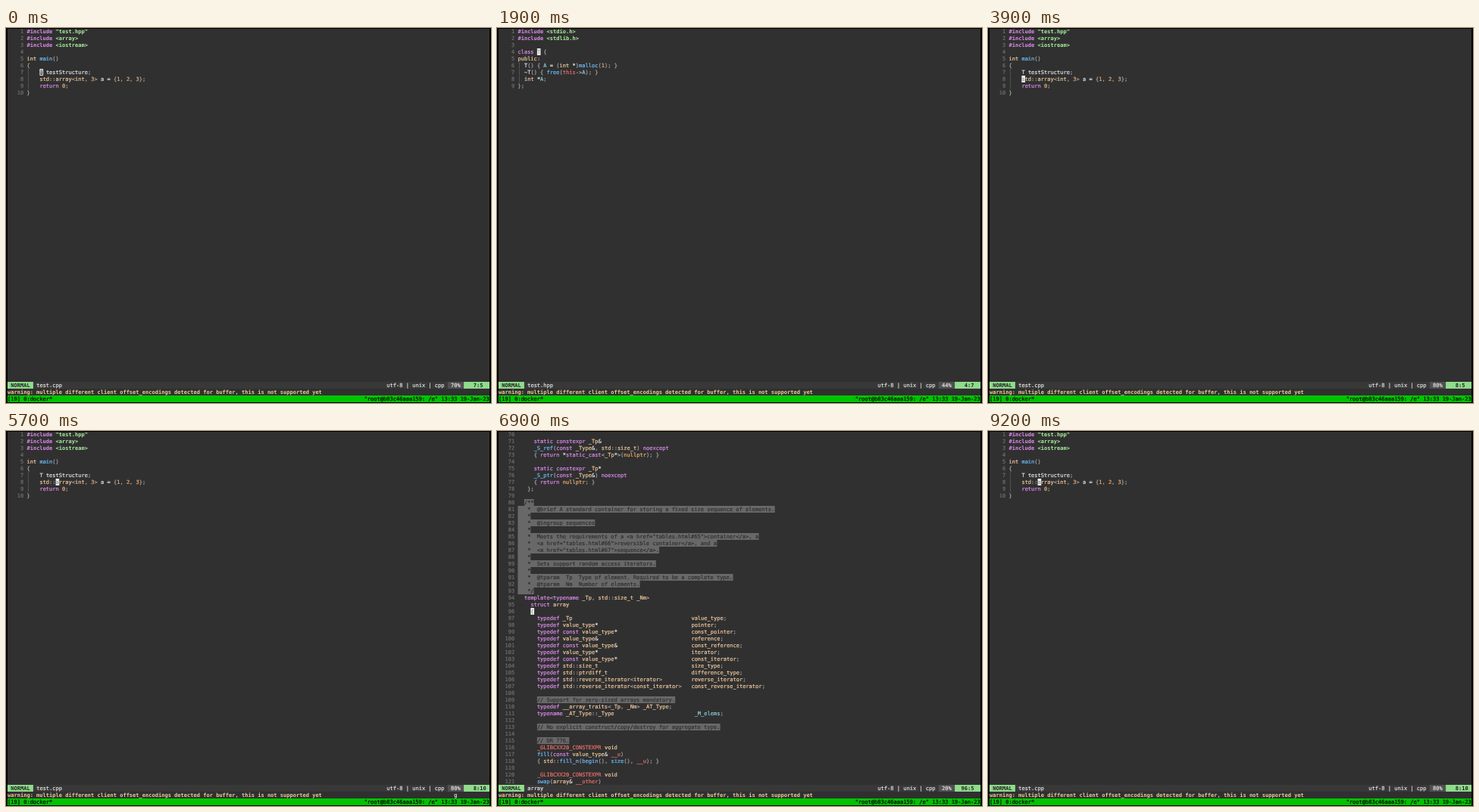
Write an HTML page with a canvas that moves like this. It is 640 by 496 pixels and loops after 9.3 s.

```html
<!DOCTYPE html>
<html lang="en">
<head>
<meta charset="utf-8">
<title>Go to definition</title>
<style>
html, body { margin: 0; width: 100%; height: 100%; overflow: hidden; background: #000; }
canvas { display: block; }
</style>
</head>
<body>
<canvas id="screen" width="640" height="496"></canvas>
<script>
const ctx = document.getElementById('screen').getContext('2d');
const LOOP = 9300, LEFT = 2, CELL = 4.24, ROW = 9, GUTTER = 6;
const color = {
  bg: '#303030', bar: '#383838', chip: '#505050', mode: '#8fdc8c', tmux: '#00c400',
  plain: '#e4e4e4', punct: '#a6a6a6', number: '#6e6e6e', guide: '#6a6a6a',
  keyword: '#de8cee', string: '#a8f09c', type: '#eec89e', constant: '#f0ae74',
  call: '#6cbcfa', param: '#e8706c', member: '#8accda',
  note: '#303030', noteBg: '#686868', warning: '#f0c898', cursor: '#f0f0f0'
};

const files = {
  'test.cpp': { first: 1, total: 10, text: `#include "test.hpp"
#include <array>
#include <iostream>

int main()
{
┆   T testStructure;
┆   std::array<int, 3> a = {1, 2, 3};
┆   return 0;
}` },
  'test.hpp': { first: 1, total: 9, text: `#include <stdio.h>
#include <stdlib.h>

class T {
public:
┆ T() { A = (int *)malloc(1); }
┆ ~T() { free(this->A); }
┆ int *A;
};` },
  'array': { first: 70, total: 460, text: `
     static constexpr _Tp&
     _S_ref(const _Type&, std::size_t) noexcept
     { return *static_cast<_Tp*>(nullptr); }

     static constexpr _Tp*
     _S_ptr(const _Type&) noexcept
     { return nullptr; }
   };

  /**
   *  @brief A standard container for storing a fixed size sequence of elements.
   *
   *  @ingroup sequences
   *
   *  Meets the requirements of a <a href="tables.html#65">container</a>, a
   *  <a href="tables.html#66">reversible container</a>, and a
   *  <a href="tables.html#67">sequence</a>.
   *
   *  Sets support random access iterators.
   *
   *  @tparam  Tp  Type of element. Required to be a complete type.
   *  @tparam  Nm  Number of elements.
   */
  template<typename _Tp, std::size_t _Nm>
    struct array
    {
      typedef _Tp                                     value_type;
      typedef value_type*                             pointer;
      typedef const value_type*                       const_pointer;
      typedef value_type&                             reference;
      typedef const value_type&                       const_reference;
      typedef value_type*                             iterator;
      typedef const value_type*                       const_iterator;
      typedef std::size_t                             size_type;
      typedef std::ptrdiff_t                          difference_type;
      typedef std::reverse_iterator<iterator>         reverse_iterator;
      typedef std::reverse_iterator<const_iterator>   const_reverse_iterator;

      // Support for zero-sized arrays mandatory.
      typedef __array_traits<_Tp, _Nm> _AT_Type;
      typename _AT_Type::_Type                         _M_elems;

      // No explicit construct/copy/destroy for aggregate type.

      // DR 776.
      _GLIBCXX20_CONSTEXPR void
      fill(const value_type& __u)
      { std::fill_n(begin(), size(), __u); }

      _GLIBCXX20_CONSTEXPR void
      swap(array& __other)` }
};

// Start time, file, cursor line and column, pending keys
const steps = [
  [0, 'test.cpp', 7, 5],
  [800, 'test.cpp', 7, 5, 'g'],
  [1000, 'test.hpp', 4, 7],
  [2800, 'test.cpp', 7, 5],
  [3500, 'test.cpp', 8, 5],
  [4700, 'test.cpp', 8, 8],
  [5100, 'test.cpp', 8, 10],
  [5700, 'test.cpp', 8, 10, 'g'],
  [5900, 'array', 95, 12],
  [6700, 'array', 96, 5],
  [7300, 'array', 97, 12],
  [7600, 'array', 98, 12],
  [8800, 'test.cpp', 8, 10]
];

// The first matching rule colours a token
const rules = [
  [/^#include$/, 'keyword'],
  [/^(".*"|<[\w.]+>)$/, 'string'],
  [/^┆$/, 'guide'],
  [/^(class|return|static|constexpr|const|typedef|template|typename|struct|noexcept|static_cast)$/, 'keyword'],
  [/^(\d+|nullptr)$/, 'constant'],
  [/^(this|__u|__other|_GLIBCXX\w+)$/, 'param'],
  [/^(A|_M_elems)$/, 'member'],
  [/^(T|testStructure|a|[=*&~]+)$/, 'plain'],
  [/^(main|malloc|free|_S_ref|_S_ptr|fill|fill_n|swap|begin|size)$/, 'call'],
  [/^\w+$/, 'type'],
  [/./, 'punct']
];

function fill(row, col, count, style) {
  ctx.fillStyle = style;
  ctx.fillRect(LEFT + col * CELL, row * ROW, count * CELL, ROW);
}

// A hairline stroke gives regular text the weight of smoothed terminal type
function write(row, col, text, style, bold) {
  const x = LEFT + col * CELL, y = row * ROW + 7;
  ctx.font = `${bold ? 'bold ' : ''}${CELL / 0.602}px "DejaVu Sans Mono", monospace`;
  ctx.fillStyle = ctx.strokeStyle = style;
  ctx.lineWidth = 0.2;
  ctx.fillText(text, x, y);
  if (!bold) ctx.strokeText(text, x, y);
}

function drawCode(row, line) {
  const isDoc = /^ *\/?\*/.test(line);
  const noteAt = isDoc ? Math.max(0, line.indexOf('/**')) : line.indexOf('//');
  if (noteAt >= 0) {
    fill(row, GUTTER + noteAt, line.length - noteAt, color.noteBg);
    write(row, GUTTER + noteAt, line.slice(noteAt), color.note);
    return;
  }
  const isInclude = line.startsWith('#');
  const tokens = isInclude ? /\S+/g : /\w+|[=*&~]+|[^\w\s=*&~]/g;
  for (const { 0: token, index } of line.matchAll(tokens)) {
    const kind = rules.find(([pattern]) => pattern.test(token))[1];
    write(row, GUTTER + index, token, color[kind], isInclude);
  }
}

function drawCursor(row, col, char, hollow) {
  if (hollow) {
    ctx.strokeStyle = color.cursor;
    ctx.lineWidth = 1;
    ctx.strokeRect(LEFT + col * CELL + 0.5, row * ROW + 0.5, CELL - 0.5, ROW - 1);
    return;
  }
  fill(row, col, 1.1, color.cursor);
  write(row, col, char, '#999');
}

function drawStatus(name, line, column, total, keys) {
  const percent = Math.floor(line / total * 100) + '%';
  const place = `${line}`.padStart(3) + ':' + `${column}`.padEnd(2);
  fill(52, 0, 150, color.bar);
  fill(52, 0, 8, color.mode);
  write(52, 1, 'NORMAL', '#202020', true);
  write(52, 9, name, color.plain);
  write(52, 118, 'utf-8 | unix | cpp', color.plain);
  fill(52, 137, 5, color.chip);
  write(52, 138, percent, color.plain);
  fill(52, 142, 8, color.mode);
  write(52, 143, place, '#202020', true);

  write(53, 0, 'warning: multiple different client offset_encodings detected for buffer, this is not supported yet', color.warning, true);
  write(53, 139, keys, color.plain);

  fill(54, 0, 150, color.tmux);
  write(54, 0, '[19] 0:docker*', '#000');
  write(54, 111, '"root@b83c46aaa159: /e" 13:33 19-Jan-23', '#000');
}

function draw([start, name, line, column, keys = '']) {
  const { first, total, text } = files[name];
  const lines = text.split('\n');
  ctx.fillStyle = '#000';
  ctx.fillRect(0, 0, 640, 496);
  ctx.fillStyle = color.bg;
  ctx.fillRect(LEFT, 1, 150 * CELL, 494);
  lines.forEach((code, row) => {
    write(row, 2, `${first + row}`.padStart(3), color.number);
    drawCode(row, code);
  });
  const row = line - first;
  drawCursor(row, GUTTER + column - 1, lines[row][column - 1], start === 0);
  drawStatus(name, line, column, total, keys);
}

ctx.textRendering = 'geometricPrecision';
ctx.lineJoin = 'round';
let shown;
function tick() {
  const time = performance.now() % LOOP;
  const step = steps.findLast(([start]) => start <= time);
  if (step !== shown) draw(shown = step);
  requestAnimationFrame(tick);
}
tick();
</script>
</body>
</html>
```
